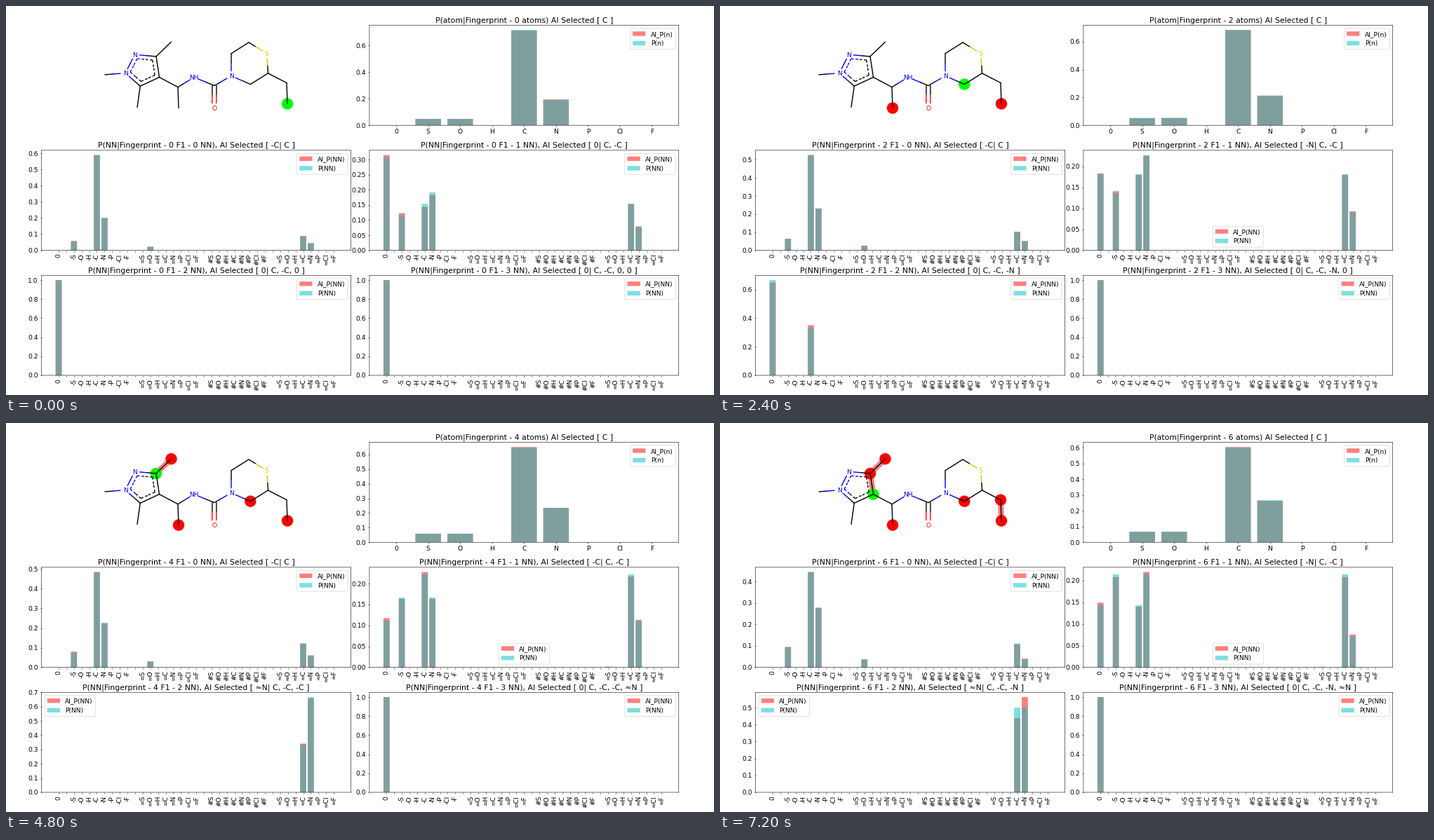
A matplotlib script for the animation above (8 s loop, 1009 by 555 pixels).

```python
import matplotlib.pyplot as plt
import numpy as np
from matplotlib.animation import FuncAnimation

W, H = 1009, 555
DPI = W / 20
PX = 72 / DPI  # points per pixel
EPS = 1e-6     # keeps the pixel size from rounding down

plt.rcParams.update({"font.size": 13, "path.snap": False})

ELEMENTS = ["S", "O", "H", "C", "N", "P", "Cl", "F"]
ATOM_LABELS = ["0"] + ELEMENTS
NN_LABELS = ["0"]
for mark in "-=#≈":
    NN_LABELS += [""] + [mark + e for e in ELEMENTS]

# name: (element, x, y)
ATOMS = {
    "a": ("C", 141, 98), "b": ("C", 235.5, 51.2), "c": ("C", 187, 144.5),
    "d": ("C", 214, 72), "e": ("C", 218.5, 101.7), "f": ("C", 191.3, 114.3),
    "g": ("C", 245, 115.7), "h": ("C", 246, 145.6), "i": ("C", 297, 113.6),
    "j": ("C", 321, 67.8), "k": ("C", 346, 52), "l": ("C", 348.3, 111.7),
    "m": ("C", 373.5, 96), "n": ("C", 400, 109.7), "o": ("C", 401, 139.5),
    "p": ("N", 183.5, 69.3), "q": ("N", 170, 95.7), "r": ("N", 268, 101.7),
    "s": ("N", 321, 99.7), "t": ("O", 296.6, 145.6), "u": ("S", 371.7, 67.8),
}
BONDS = ("a-q b-d c-f e-g g-h g-r r-i i-s s-j j-k k-u u-m m-l l-s m-n n-o "
         "i=t d≈e e≈f f≈q q≈p p≈d").split()
RING = "defqp"
COLORS = {"C": "black", "N": "blue", "O": "red", "S": "#cccc00"}

PICKED = "ohlbdne"
FIRST = ["0", "0", "-N", "0", "-C", "-C", "-N"]
SECOND = ["0", "0", "0", "0", "≈N", "-N", "≈N"]
PREFIX = [None, None, ["-C", "-N"], None, ["-C", "≈C"], ["-C", "-C"], ["-C", "≈C"]]

# Model estimates that differ from the exact probabilities, per step
AI_ATOM = [
    {"C": .711, "N": .194}, {"S": .048}, {"S": .051, "N": .2135}, {"C": .6695},
    {"C": .651}, {"C": .629}, {"C": .604, "N": .2635},
]
AI_NN0 = [
    {"-S": .058}, {}, {}, {"-S": .0735}, {"-S": .0795, "-N": .223},
    {"-S": .0875}, {"-S": .0955, "≈C": .1085, "≈N": .0405},
]
AI_NN1 = [
    {"0": .3155, "-S": .123, "-C": .144, "-N": .1835, "≈N": .0795},
    {"0": .258, "-S": .131, "-C": .1595, "-N": .202, "≈N": .086},
    {"0": .1835, "-S": .141, "-C": .1802, "-N": .2255, "≈C": .1795, "≈N": .093},
    {"0": .2045, "-S": .154, "-N": .146, "≈C": .196, "≈N": .1018},
    {"0": .1175, "-S": .1635, "-C": .2275, "-N": .1635, "≈C": .217,
     "≈N": .113, "≈S": .0015},
    {"0": .1278, "-C": .2572, "≈C": .178, "≈N": .0645},
    {"0": .149, "-S": .208, "-C": .14, "-N": .2195, "≈C": .208,
     "≈N": .0755, "≈S": .0012},
]
AI_NN2 = [
    {}, {}, {"0": .65, "-C": .351}, {}, {"≈C": .341, "≈N": .659},
    {"0": .339, "-S": .316, "-N": .344}, {"≈C": .438, "≈N": .562},
]


def neighbours(name):
    found = []
    for first, kind, second in BONDS:
        if name in (first, second):
            other = second if name == first else first
            found.append(kind + ATOMS[other][0])
    return found


def atom_probs(step):
    left = [ATOMS[n][0] for n in ATOMS if n not in PICKED[:step]]
    return {e: left.count(e) / len(left) for e in set(left)}


def neighbour_probs(step, prefix):
    """Chance of the next neighbour of a free carbon that has the prefix."""
    pools = []
    for name, (element, *_) in ATOMS.items():
        if element != "C" or name in PICKED[:step]:
            continue
        pool = neighbours(name)
        if all(pool.count(p) >= prefix.count(p) for p in prefix):
            for p in prefix:
                pool.remove(p)
            pools.append(pool or ["0"])
    probs = {}
    for pool in pools:
        for item in pool:
            probs[item] = probs.get(item, 0) + 1 / len(pool) / len(pools)
    return probs


fig = plt.figure(figsize=((W + EPS) / DPI, (H + EPS) / DPI), dpi=DPI, facecolor="white")
grid = fig.add_gridspec(3, 2, left=.0502, right=.9502, bottom=.0505, top=.9505,
                        wspace=.06, hspace=.25)
mol = fig.add_axes([0, 0, 1, 1], zorder=-1)
ax_atom = fig.add_subplot(grid[0, 1])
ax_nn = [fig.add_subplot(grid[row, col]) for row in (1, 2) for col in (0, 1)]


def draw_bars(ax, labels, probs, ai, title, name, step, legend="upper right", rotation=0):
    ax.cla()
    guess = {**probs, **ai}
    xs = range(len(labels))
    for values, color, label in ((guess, "r", "AI_" + name), (probs, "c", name)):
        ax.bar(xs, [values.get(l, 0) for l in labels], color=color, alpha=.5, label=label)
    top = 1.05 * max([*probs.values(), *guess.values()])
    ax.set_ylim(0, top)
    ax.set_yticks(np.arange(0, top + 1e-9, step))
    ax.yaxis.set_major_formatter("{x:.2f}" if step < .1 else "{x:.1f}")
    ax.set_xticks(xs, labels, rotation=rotation)
    ax.set_title(title)
    ax.legend(loc=legend)


def draw_half_bonds(p, q, color_p, color_q, **style):
    mid = (p + q) / 2
    for start, color in ((p, color_p), (q, color_q)):
        mol.plot(*zip(start, mid), color=color, lw=1.4 * PX, **style)


def draw_bond(first, kind, second):
    ends, colors = [], []
    for name, other in ((first, second), (second, first)):
        element, *pos = ATOMS[name]
        pos, target = np.array(pos), np.array(ATOMS[other][1:])
        if element != "C":
            pos = pos + 7 * (target - pos) / np.hypot(*(target - pos))
        ends.append(pos)
        colors.append(COLORS[element])
    offsets = (-3, 3) if kind == "=" else (0,)
    for dx in offsets:
        draw_half_bonds(*(p + (dx, 0) for p in ends), *colors, solid_capstyle="round")
    if kind == "≈":
        center = np.mean([ATOMS[n][1:] for n in RING], axis=0)
        inner = [center + .72 * (np.array(ATOMS[n][1:]) - center) for n in (first, second)]
        draw_half_bonds(*inner, *colors, ls=(0, (2.6, 2)))


def draw_molecule(step):
    mol.cla()
    mol.set(xlim=(0, W), ylim=(H, 0))
    mol.axis("off")
    picked = PICKED[:step + 1]
    for first, _, second in BONDS:
        if first in picked and second in picked:
            (x0, y0), (x1, y1) = ATOMS[first][1:], ATOMS[second][1:]
            mol.plot([x0, x1], [y0, y1], color="#ff7f7f", lw=8 * PX,
                     solid_capstyle="butt", zorder=0)
    for name in picked:
        color = "lime" if name == picked[-1] else "red"
        mol.add_patch(plt.Circle(ATOMS[name][1:], 8.2, color=color, lw=0, zorder=1))
    for bond in BONDS:
        draw_bond(*bond)
    for name, (element, x, y) in ATOMS.items():
        if element != "C":
            mol.text(x, y, "NH" if name == "r" else element, color=COLORS[element],
                     size=9 * PX, ha="center", va="center_baseline")


def draw_step(k):
    draw_molecule(k)
    draw_bars(ax_atom, ATOM_LABELS, atom_probs(k), AI_ATOM[k],
              f"P(atom|Fingerprint - {k} atoms) AI Selected [ C ]", "P(n)",
              .2 if k < 4 else .1)
    prefix = PREFIX[k]
    third = neighbour_probs(k, prefix) if prefix else {"0": 1}
    probs = [neighbour_probs(k, []), neighbour_probs(k, ["-C"]), third, {"0": 1}]
    guesses = [AI_NN0[k], AI_NN1[k], AI_NN2[k], {}]
    steps = [.1, .05, .2 if k < 4 else .1, .2]
    legends = ["upper right", "lower center" if k in (2, 3, 4, 6) else "upper right",
               "upper left" if k in (4, 6) else "upper right", "upper right"]
    chain = ["C", "-C", FIRST[k], SECOND[k], "0"]
    for n, ax in enumerate(ax_nn):
        title = (f"P(NN|Fingerprint - {k} F1 - {n} NN), AI Selected "
                 f"[ {chain[n + 1]}| {', '.join(chain[:n + 1])} ]")
        draw_bars(ax, NN_LABELS, probs[n], guesses[n], title, "P(NN)",
                  steps[n], legends[n], 90)


def update(i):
    draw_step(i // 3)
    return []


anim = FuncAnimation(fig, update, frames=20, interval=400, repeat=True,
                     repeat_delay=0, init_func=lambda: [], blit=False)
plt.show()
```
